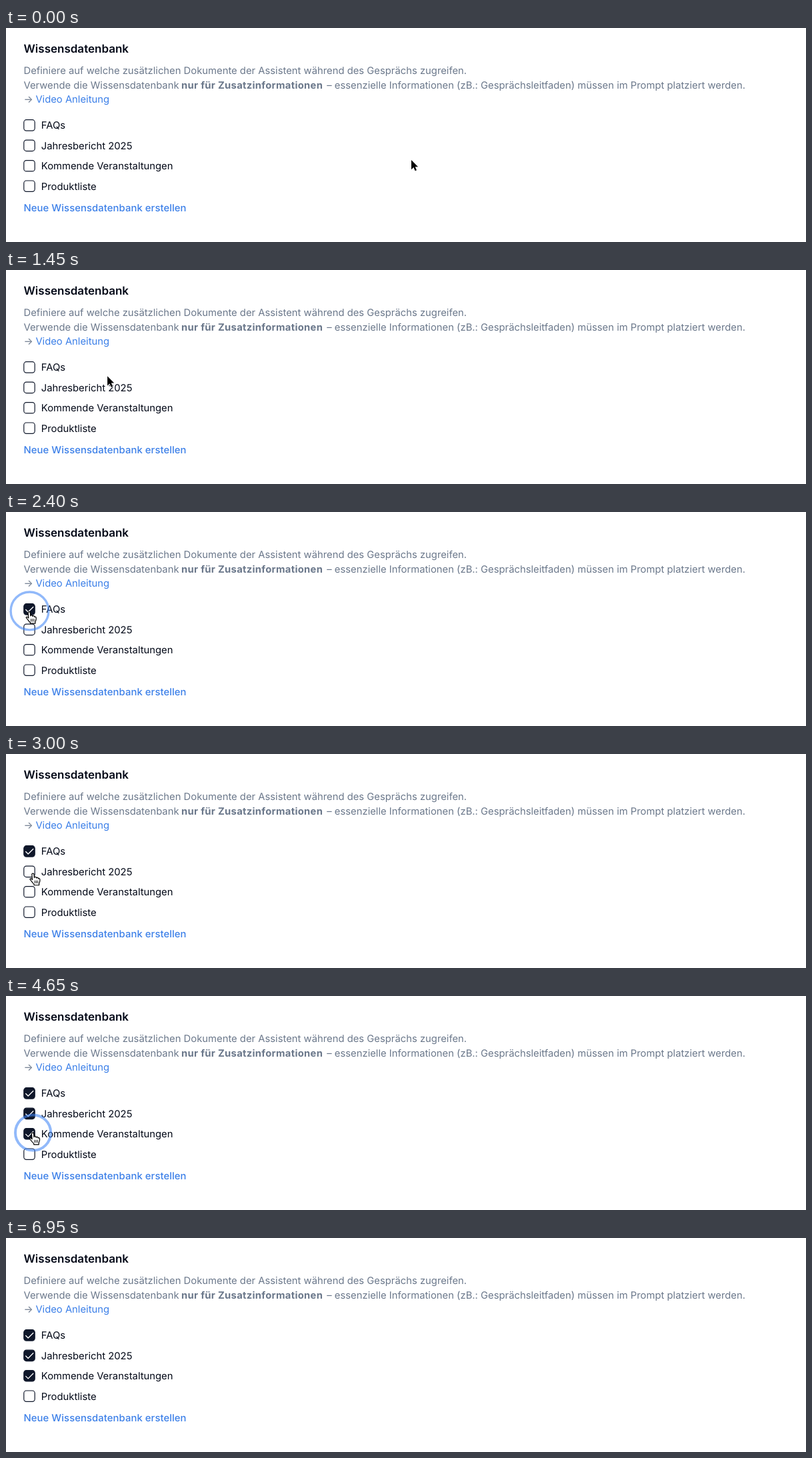
Animation of 1200 by 321 pixels, one loop 7.3 s. Source, as an HTML page:

```html
<!DOCTYPE html>
<html lang="de">
<head>
<meta charset="utf-8">
<title>Wissensdatenbank</title>
<style>
  html, body { margin: 0; width: 100%; height: 100%; overflow: hidden; background: #fff; }
  svg { display: block; width: 100vw; height: 100vh; }
  text { font: 400 14.8px Inter, sans-serif; font-optical-sizing: none; fill: #020817; white-space: pre; text-rendering: geometricPrecision; }
  .title { font-size: 17px; font-weight: 600; }
  .muted { fill: #6b788b; }
  .bold { font-weight: 700; letter-spacing: .02em; }
  .link { fill: #3b7fe8; }
  .medium { font-weight: 500; letter-spacing: .006em; }
</style>
</head>
<body>
<svg viewBox="0 0 1200 321">
  <text class="title" x="26.5" y="37.2">Wissensdatenbank</text>
  <text class="muted" x="26.5" y="68.8">Definiere auf welche zusätzlichen Dokumente der Assistent während des Gesprächs zugreifen.</text>
  <text class="muted" x="26.5" y="90.6">Verwende die Wissensdatenbank <tspan class="bold" x="263">nur für Zusatzinformationen</tspan><tspan x="481.3">– essenzielle Informationen (zB.: Gesprächsleitfaden) müssen im Prompt platziert werden.</tspan></text>
  <text class="muted" x="26.5" y="112.3">→</text>
  <text class="link" x="44.4" y="112.3">Video Anleitung</text>
  <g id="list"></g>
  <text class="link medium" x="26.5" y="275.2">Neue Wissensdatenbank erstellen</text>
  <circle id="ring" fill="none" stroke="#3b82f6" stroke-opacity=".56"/>
  <g id="cursor" stroke-linejoin="round">
    <path id="arrow" transform="scale(.94)" d="M0 0V15.2L3.6 11.8 6 17.4 8.5 16.3 6.1 10.9H10.7Z" stroke="#fff" stroke-width="1.8" paint-order="stroke"/>
    <g id="hand" fill="none" stroke="#000" stroke-width="1.2" stroke-linecap="round">
      <path fill="#fff" d="M-1.9 1.7Q-1.9 .2-.3 .2 1.2 .2 1.3 1.7L1.7 6.6Q2 5.1 3.4 5.3 4.7 5.6 4.8 7.1 5.4 6 6.7 6.4 7.8 6.8 7.8 8.1 9 7.2 9.8 8.2 10.4 9 10.2 11 10 13.5 8.9 15.2V17.8H1.4V16.4Q-1 14.2-2.6 11.7-5 9.4-4.7 8.5-4 7.2-2.2 8.5L-1.2 9.6Z"/>
      <path stroke-width=".9" d="M2.6 11.2V14.7M4.8 11.2V14.7M7 11.2V14.7"/>
    </g>
  </g>
</svg>
<script>
const LOOP = 7300, STEP = 50, RING_MS = 500, RING_R = 38.5;
const $ = id => document.getElementById(id);
const set = (el, attrs) => { for (const k in attrs) el.setAttribute(k, attrs[k]); };
const show = (el, on) => { el.style.display = on ? '' : 'none'; };

const labels = ['FAQs', 'Jahresbericht 2025', 'Kommende Veranstaltungen', 'Produktliste'];
const rowY = i => 145.9 + i * 30.43;

const clicks = [
  { t: 2220, x: 35.5, y: 148.4 },
  { t: 3414, x: 41, y: 178.4 },
  { t: 4488, x: 40.6, y: 205 }
];

const inOut = u => u < .5 ? 4 * u ** 3 : 1 - 4 * (1 - u) ** 3;
const linear = u => u;
const start = [608, 198];
const moves = [
  { from: 950, to: 1745, end: [35, 149.4], ease: inOut },
  { from: 2450, to: 3050, end: [40.7, 179], ease: inOut },
  { from: 3750, to: 4350, end: [40.3, 205], ease: inOut },
  { from: 4680, to: 5050, end: [397, 218.5], ease: inOut },
  { from: 6100, to: 6350, end: [800, -22], ease: linear }
];

$('list').innerHTML = labels.map((label, i) => `
  <g transform="translate(35 ${rowY(i)})">
    <rect x="-8.2" y="-8.2" width="16.4" height="16.4" rx="3.8" stroke="#0f172a" stroke-width="1.2" fill="#fff"/>
    <path d="M5.8-3.5-1.8 4.1-5.3 .6" fill="none" stroke="#fff" stroke-width="1.35" stroke-linecap="round" stroke-linejoin="round"/>
    <text x="17.8" y="5.4">${label}</text>
  </g>`).join('');
const boxes = [...$('list').querySelectorAll('rect')];
const ticks = [...$('list').querySelectorAll('path')];

function pointer(t) {
  let pos = start;
  for (const m of moves) {
    if (t < m.from) break;
    const k = m.ease(Math.min(1, (t - m.from) / (m.to - m.from)));
    pos = pos.map((v, i) => v + (m.end[i] - v) * k);
  }
  return pos;
}

function render(t) {
  boxes.forEach((box, i) => {
    const on = i < clicks.length && t >= clicks[i].t;
    box.setAttribute('fill', on ? '#0f172a' : '#fff');
    show(ticks[i], on);
  });

  const click = clicks.find(c => t >= c.t && t < c.t + RING_MS);
  show($('ring'), click);
  if (click) {
    const r = RING_R * (1 - (1 - (t - click.t) / RING_MS) ** 3);
    set($('ring'), { cx: click.x, cy: click.y, r, 'stroke-width': Math.min(4.5, (RING_R - r) / 3) });
  }

  const [x, y] = pointer(t);
  const over = Math.abs(x - 35) < 9 && labels.some((_, i) => Math.abs(y - rowY(i)) < 9);
  set($('cursor'), { transform: `translate(${x} ${y})` });
  show($('cursor'), t < 6350);
  show($('hand'), over);
  show($('arrow'), !over);
}

const t0 = performance.now();
function tick() {
  const t = (performance.now() - t0) % LOOP;
  render(Math.floor(t / STEP) * STEP);
  requestAnimationFrame(tick);
}
tick();
</script>
</body>
</html>
```
